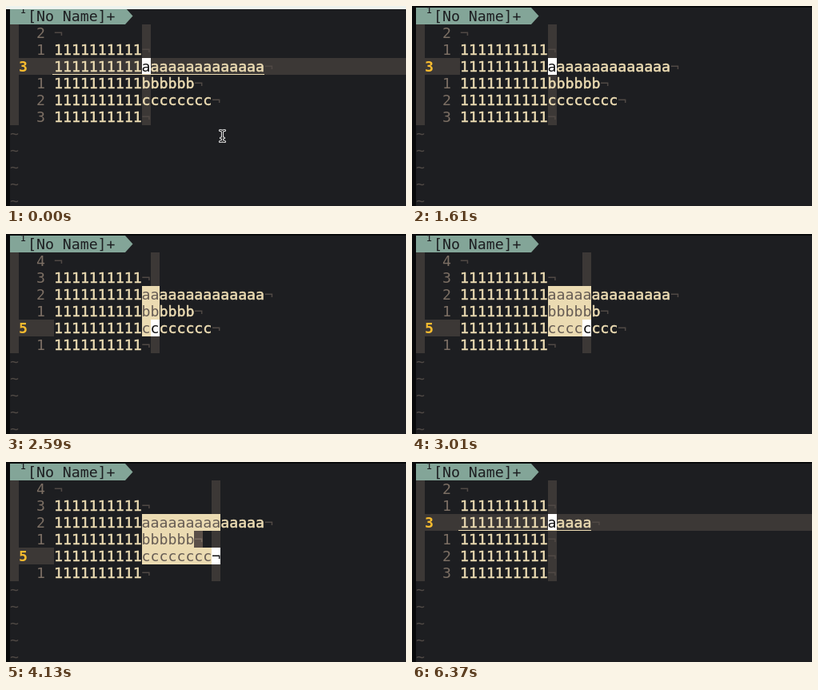
An HTML page with a canvas that plays this animation: 500 by 250 pixels, repeating every 7350 ms.

```html
<!DOCTYPE html>
<html lang="en">
<head>
<meta charset="utf-8">
<title>Block selection</title>
<style>
html, body { margin: 0; width: 100%; height: 100%; overflow: hidden; background: #1d1e21; }
canvas { display: block; width: 500px; height: 250px; }
</style>
</head>
<body>
<canvas id="stage" width="500" height="250"></canvas>
<script>
const ctx = document.getElementById('stage').getContext('2d');
const LOOP = 7350;
const CELL = 10.96, ROW = 21, LEFT = 5, TOP = 23, TEXT_X = 60;
const FONT = '18.2px "DejaVu Sans Mono", "Liberation Mono", monospace';
const C = {
  bg: '#1d1e21', edge: '#08090a', line: '#3c3836', text: '#ebdbb2',
  dim: '#504945', num: '#7c6f64', current: '#fabd2f', picked: '#665c54',
  pickedEnd: '#5a4f48', tab: '#83a598', white: '#ffffff', black: '#101012'
};

const ONES = '1'.repeat(10);
const BEFORE = ['', ONES, ONES + 'a'.repeat(14), ONES + 'b'.repeat(6), ONES + 'c'.repeat(8), ONES];
const AFTER = ['', ONES, ONES + 'a'.repeat(5), ONES, ONES, ONES];

// Key presses, in ms
const STRIP_END = 910, BLOCK = 1610, DELETE = 5250, DELETED = 5320;
const DOWN = [2100, 2310];
const RIGHT = [2520, 2660, 2870, 3010, 3220, 3430, 3570, 3920];

const pressed = (keys, t) => keys.filter(k => t >= k).length;

function stateAt(t) {
  const done = t >= DELETED;
  const visual = t >= BLOCK && !done;
  const state = {
    lines: done ? AFTER : BEFORE,
    row: done ? 2 : 2 + pressed(DOWN, t),
    col: done ? 10 : 10 + pressed(RIGHT, t),
    visual,
    line: visual ? 'none' : 'full',
    strip: t < STRIP_END,
    mouse: t < BLOCK
  };
  if (visual && t >= DELETE) state.line = 'full';
  if (t >= DOWN[0] && t < DOWN[0] + 70) state.line = 'text';
  return state;
}

function rect(x, y, w, h, color) {
  ctx.fillStyle = color;
  ctx.fillRect(x, y, w, h);
}

function write(s, x, y, color, weight = 0) {
  ctx.font = (weight === 2 ? 'bold ' : '') + FONT;
  ctx.fillStyle = color;
  ctx.fillText(s, x, y);
  if (weight === 1) {
    ctx.strokeStyle = color;
    ctx.lineWidth = 0.55;
    ctx.strokeText(s, x, y);
  }
}

const colX = c => Math.round(TEXT_X + c * CELL);
const rowY = r => TOP + r * ROW;

function fillCell(c, y, color) {
  rect(colX(c), y, colX(c + 1) - colX(c), ROW, color);
}

function drawTab(strip) {
  rect(0, 0, 500, 2, C.edge);
  ctx.fillStyle = C.tab;
  ctx.beginPath();
  ctx.moveTo(5, 2);
  ctx.lineTo(149, 2);
  ctx.lineTo(158.5, 12.5);
  ctx.lineTo(149, 23);
  ctx.lineTo(5, 23);
  ctx.fill();
  write('¹', 16, 15, C.bg);
  write('[No Name]+', 27, 19, C.bg);
  if (strip) rect(0, 0, 500, 4, '#eef3ee');
}

function drawLine(s, r) {
  const y = rowY(r), base = y + 17, text = s.lines[r];
  const here = r === s.row;
  const inBlock = s.visual && r >= 2 && r <= s.row;

  rect(LEFT, y, 11, ROW, C.line);
  if (here) {
    const end = s.line === 'full' ? 500 : s.line === 'text' ? colX(text.length) : TEXT_X;
    rect(LEFT, y, end - LEFT, ROW, C.line);
    write(String(r + 1), 16, base, C.current, 2);
  } else {
    write(String(Math.abs(r - s.row)), 38, base, C.num);
  }
  fillCell(s.col, y, C.line);

  for (let c = 0; c <= Math.max(text.length, s.col); c++) {
    const isEnd = c === text.length;
    const onCursor = here && c === s.col;
    const picked = inBlock && c >= 10 && c <= s.col && c <= text.length;
    let color = isEnd ? C.dim : C.text;
    let weight = isEnd ? 0 : 1;
    if (picked) {
      fillCell(c, y, isEnd ? C.pickedEnd : C.text);
      color = isEnd ? C.num : C.picked;
      weight = 0;
    }
    if (onCursor) {
      fillCell(c, y, C.white);
      color = C.black;
      weight = 0;
    }
    if (c <= text.length) write(isEnd ? '¬' : text[c], TEXT_X + c * CELL, base, color, weight);
  }

  if (here && s.line !== 'none') {
    const end = s.visual && s.line === 'full' ? 10 : text.length;
    rect(58, y + ROW - 1, colX(end) - 58, 1, C.text);
  }
}

function drawMouse(x, y) {
  const beam = (color, width) => {
    ctx.strokeStyle = color;
    ctx.lineWidth = width;
    ctx.beginPath();
    for (const d of [-1, 1]) {
      ctx.moveTo(x - 3, y + 7 * d);
      ctx.quadraticCurveTo(x, y + 7 * d, x, y + 5 * d);
      ctx.quadraticCurveTo(x, y + 7 * d, x + 3, y + 7 * d);
    }
    ctx.moveTo(x, y - 6);
    ctx.lineTo(x, y + 6);
    ctx.moveTo(x - 2, y + 2.5);
    ctx.lineTo(x + 2, y + 2.5);
    ctx.stroke();
  };
  ctx.lineCap = 'round';
  beam('#e8e8e8', 3.2);
  beam('#151517', 1.1);
}

function draw(t) {
  const s = stateAt(t);
  rect(0, 0, 500, 250, C.bg);
  rect(0, 0, LEFT, 250, C.edge);
  drawTab(s.strip);
  for (let r = 0; r < 6; r++) drawLine(s, r);
  for (let r = 6; r < 11; r++) write('~', LEFT, rowY(r) + 17, C.dim);
  if (s.mouse) drawMouse(270.5, 162.5);
}

const start = performance.now();
function tick() {
  draw((performance.now() - start) % LOOP);
  requestAnimationFrame(tick);
}
tick();
</script>
</body>
</html>
```
